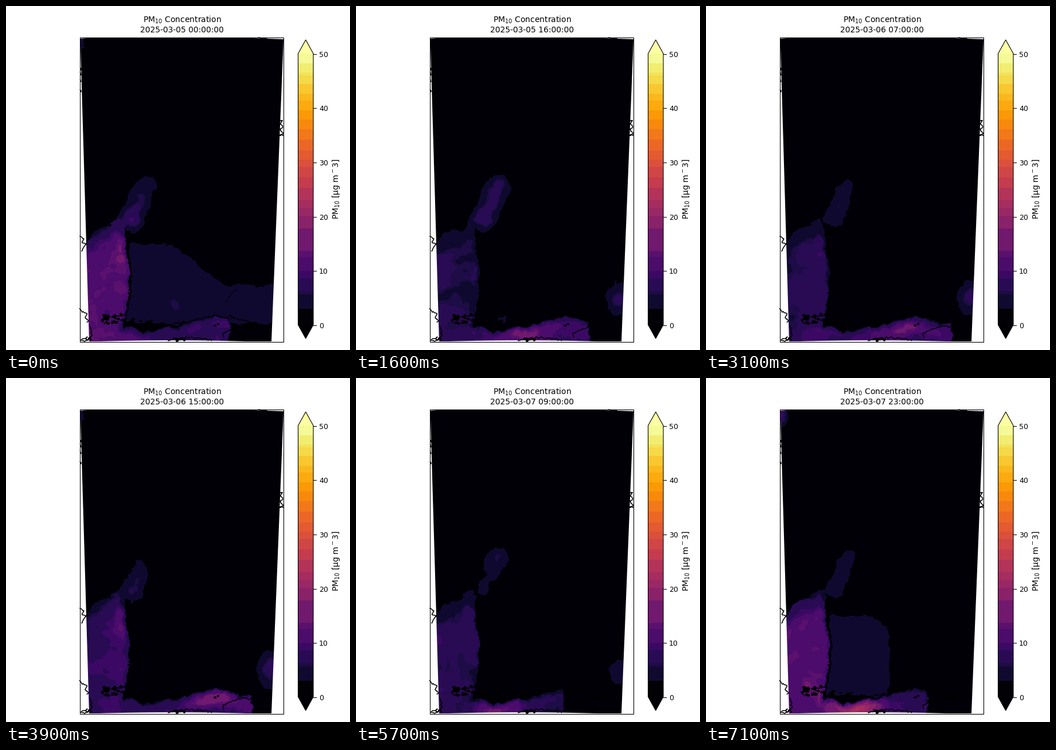
A matplotlib script for the animation above (7200 ms loop, 600x600 px).

```python
import numpy as np
import matplotlib.pyplot as plt
from matplotlib.animation import FuncAnimation
from matplotlib.patches import Polygon, Rectangle

SIZE, HOURS = 600, 72
LEFT, RIGHT, TOP, BOTTOM = 130, 484, 55, 585
BAR_L, BAR_R, BAR_TOP, BAR_BOTTOM = 509.5, 536, 83, 556
INFERNO = plt.get_cmap("inferno")
rng = np.random.default_rng(12)

# Colour bands, as heights on the colour bar
BAND_Y = [556, 528, 503, 497, 475, 462, 438, 427, 388, 366, 352, 338, 317, 299,
          281, 268, 252, 233, 215, 198, 182, 165, 153, 136, 121, 116, 100, 83]
BANDS = (BAR_BOTTOM - np.array(BAND_Y)) / (BAR_BOTTOM - BAR_TOP) * 50
BAND_RGB = INFERNO((BANDS[:-1] + BANDS[1:]) / 100)[:, :3]
BAND_RGB[0] = INFERNO(0.008)[:3]

# Levels and positions of each polluted area at a few key hours
KEY_HOURS = [0, 9, 23, 39, 50, 63, 71]
CURVES = dict(
    land=[12.2, 7.6, 4.8, 8.2, 4.6, 9.6, 11.6],
    ridge=[1.3, 0, 0, 3.5, 0.5, 2, 0.8],
    head=[5.6, 8.5, 4.4, 2.6, 6.6, 5, 3.6],
    foot=[8.6, 12, 4, 6.5, 3.8, 2.4, 4.4],
    sea=[4.3, 3.2, 2.2, 1.8, 2.7, 2.3, 4.6],
    reach=[520, 290, 240, 235, 265, 265, 320],
    strait=[8, 8, 8.4, 8, 6.2, 5, 8],
    strait_end=[392, 386, 430, 430, 425, 310, 388],
    plume=[5.5, 5.5, 5, 10.5, 4, 13, 14],
    plume_x=[178, 265, 330, 367, 335, 172, 258],
    east=[5.5, 8.4, 4.8, 7.3, 7.3, 3.5, 1],
    strip=[0, 4.6, 0, 0, 0, 0, 0],
    corner=[4.2, 3.6, 1, 4, 4.3, 1, 9],
)

gx, gy = np.meshgrid(np.arange(LEFT, RIGHT) + 0.5, np.arange(TOP, BOTTOM) + 0.5)


def noise(sigma):
    """Smooth random field with unit deviation."""
    fy = np.fft.fftfreq(gx.shape[0])[:, None]
    fx = np.fft.rfftfreq(gx.shape[1])
    gauss = np.exp(-2 * (np.pi * sigma) ** 2 * (fx ** 2 + fy ** 2))
    n = np.fft.irfft2(np.fft.rfft2(rng.standard_normal(gx.shape)) * gauss, s=gx.shape)
    return n / n.std()


def ramp(d, width):
    return np.clip(d / width, 0, 1)


def bell(u):
    return np.exp(-u ** 2)


def blob(cx, cy, rx, ry):
    return bell((X - cx) / rx) * bell((Y - cy) / ry)


def coast_x(y):
    return 213 + 4 * np.sin((y - 430) / 27)


def strait_y(x):
    return 556 - 15 * bell((x - 365) / 45) + 8 * bell((x - 245) / 30)


# Rough coordinates give every area a ragged edge
X = gx + 1.5 * noise(5) + 0.8 * noise(1.6)
Y = gy + 1.5 * noise(5) + 0.8 * noise(1.6)
textures = [0.09 * noise(13) + 0.035 * noise(4) for _ in range(2)]

from_coast = coast_x(Y) - X
from_north = Y - 415 + 47 * np.sqrt(ramp(X - 140, 67))
land = (ramp(np.minimum(from_coast, from_north), 2)
        * (0.65 + 0.35 * ramp(from_coast, 10)) * (0.45 + 0.55 * ramp(from_north, 45)))
ridge = land * bell((from_coast - 15) / 9) * bell((Y - 420) / 40)

# Tongue of dust: a capsule running from its foot up to its head
foot, head = np.array([220, 372]), np.array([246, 315])
axis = head - foot
along = np.clip(((X - foot[0]) * axis[0] + (Y - foot[1]) * axis[1]) / (axis @ axis), 0, 1)
tongue = bell(np.hypot(X - foot[0] - along * axis[0], Y - foot[1] - along * axis[1]) / 23)

slope = ramp(X - 280, 110)
sea_top = 412 + 72 * slope ** 2 * (3 - 2 * slope)
in_sea = np.minimum(np.minimum(-from_coast, Y - sea_top), 556 - Y)
sea_tone = 0.9 + 0.15 * ramp(Y - 400, 130)

in_strait = Y - strait_y(X)
strait_tone = 0.5 + 0.5 * ramp(in_strait, 10)
plume_tone = bell((in_strait - 18) / 13)

east, strip, corner = blob(460, 508, 26, 33), blob(468, 400, 16, 90), blob(130, 65, 12, 20)


def concentration(hour):
    c = {name: np.interp(hour, KEY_HOURS, v) for name, v in CURVES.items()}
    strait = c["strait"] * strait_tone + c["plume"] * plume_tone * bell((X - c["plume_x"]) / 48)
    areas = [
        c["land"] * land + c["ridge"] * ridge,
        (c["foot"] + (c["head"] - c["foot"]) * along) * tongue,
        c["sea"] * sea_tone * ramp(np.minimum(in_sea, c["reach"] - X), 4),
        strait * ramp(np.minimum(in_strait, c["strait_end"] - X), 4),
        c["east"] * east, c["strip"] * strip, c["corner"] * corner,
    ]
    turn = 2 * np.pi * hour / 48
    texture = textures[0] * np.cos(turn) + textures[1] * np.sin(turn)
    return np.maximum.reduce(areas) * (1 + texture)


def shade(hour):
    band = np.digitize(concentration(hour), BANDS) - 1
    return BAND_RGB[np.clip(band, 0, len(BAND_RGB) - 1)]


fig = plt.figure(figsize=(6, 6), dpi=100, facecolor="white")
ax = fig.add_axes([0, 0, 1, 1])
ax.axis("off")
image = ax.imshow(shade(0), extent=(LEFT, RIGHT, BOTTOM, TOP),
                  interpolation="nearest", aspect="auto")
ax.set_xlim(0, SIZE)
ax.set_ylim(SIZE, 0)

# White margins around the slanted, slightly bowed model domain
for margin in ([(130, 70), (130, 585), (145.3, 585)], [(484, 58), (484, 585), (463, 585)],
               [(130, 55), (155, 55), (130, 57)], [(400, 55), (484, 55), (484, 58.2)]):
    ax.fill(*zip(*margin), color="white", lw=0, zorder=2)
bow = np.linspace(LEFT, RIGHT, 60)
ax.fill_between(bow, np.minimum(582.6 + 2.4 * ((bow - 290) / 145) ** 2, 585), 585,
                color="white", lw=0, zorder=2)
frame = Rectangle((129.2, 54.8), 355, 531, fill=False, lw=0.8, zorder=5)
ax.add_patch(frame)


def coast(x, y, rough=0.9, lw=1.1):
    """Draw a ragged shoreline through the given points."""
    s = np.r_[0, np.cumsum(np.hypot(np.diff(x), np.diff(y)))]
    t = np.arange(0, s[-1], 2.2)
    px, py = (np.interp(t, s, v) + rng.normal(0, rough, t.size) for v in (x, y))
    ax.plot(px, py, color="black", lw=lw, zorder=4, clip_path=frame)


def islands(cx, cy, w, h, count):
    a = np.linspace(0, 2 * np.pi, 9)
    for _ in range(count):
        r = rng.uniform(0.5, 2.2) * rng.uniform(0.6, 1.3, 9)
        px, py = cx + rng.uniform(-w, w), cy + rng.uniform(-h, h)
        ax.fill(px + 1.3 * r * np.cos(a), py + r * np.sin(a), fc="black", ec="black",
                lw=0.8, zorder=4)


down = np.arange(388, 530, 4)
coast(coast_x(down), down, rough=1.2)
across = np.arange(216, 396, 4)
coast(across, strait_y(across) - 12 * bell((across - 212) / 18), rough=1.3)
coast([383, 392, 404], [516, 503, 494], rough=0.5, lw=0.8)
coast([388, 402, 416, 432, 430, 412, 388, 378, 380],
      [540, 545, 548, 554, 560, 558, 566, 571, 580], rough=0.8)
coast([285, 315, 345, 360], [583, 578, 580, 584])
for spot in ((180, 546, 13, 8, 34), (204, 543, 9, 7, 10), (236, 551, 20, 6, 22),
             (300, 582, 12, 2, 8), (214, 395, 3, 6, 4), (362, 556, 12, 2, 3)):
    islands(*spot)

# Shore fragments outside the domain
coast([130, 137, 134, 141, 136, 131], [403, 406, 413, 414, 420, 429])
coast([130, 141, 138, 145, 141], [530, 538, 544, 548, 551])
coast([130, 143, 139, 147, 143, 132], [583, 576, 582, 578, 584, 584])
coast([147, 150, 146], [560, 572, 584])
coast([477, 483, 479, 483, 478, 482, 477, 484], [199, 200, 206, 212, 217, 222, 226, 226])
coast([441, 448, 455], [55, 57, 56], rough=0.6)
for y in (108, 116, 128, 146):
    coast([130, 131], [y, y + 5], rough=0.4)

# Colour bar
tip = (BAR_L + BAR_R) / 2
for low, high, rgb in zip(BAND_Y, BAND_Y[1:], BAND_RGB):
    ax.add_patch(Rectangle((BAR_L, high), BAR_R - BAR_L, low - high, color=rgb, lw=0,
                           antialiased=False))
for edge, end, rgb in ((BAR_TOP, 59, INFERNO(1.0)), (BAR_BOTTOM, 580, INFERNO(0.0))):
    ax.add_patch(Polygon([(BAR_L, edge), (tip, end), (BAR_R, edge)], color=rgb, lw=0))
ax.add_patch(Polygon([(BAR_L, BAR_TOP), (tip, 59), (BAR_R, BAR_TOP), (BAR_R, BAR_BOTTOM),
                      (tip, 580), (BAR_L, BAR_BOTTOM)], fill=False, lw=0.8))
for value in range(0, 51, 10):
    y = BAR_BOTTOM + 0.8 - value / 50 * (BAR_BOTTOM - BAR_TOP)
    ax.plot([BAR_R, BAR_R + 4.9], [y, y], color="black", lw=0.8)
    ax.text(546, y, str(value), size=9, va="center_baseline")
ax.text(567, 319.5, r"PM$_{10}$ [µg m$^-3$]", size=10, rotation=90, ha="left", va="center")
title = ax.text(306.85, 46.47, "", size=10, ha="center", va="baseline")


def draw(hour):
    image.set_data(shade(hour))
    title.set_text("PM$_{10}$ Concentration\n"
                   f"2025-03-{5 + hour // 24:02d} {hour % 24:02d}:00:00")
    return image, title


anim = FuncAnimation(fig, draw, frames=HOURS, interval=100, repeat=True)
plt.show()
```
